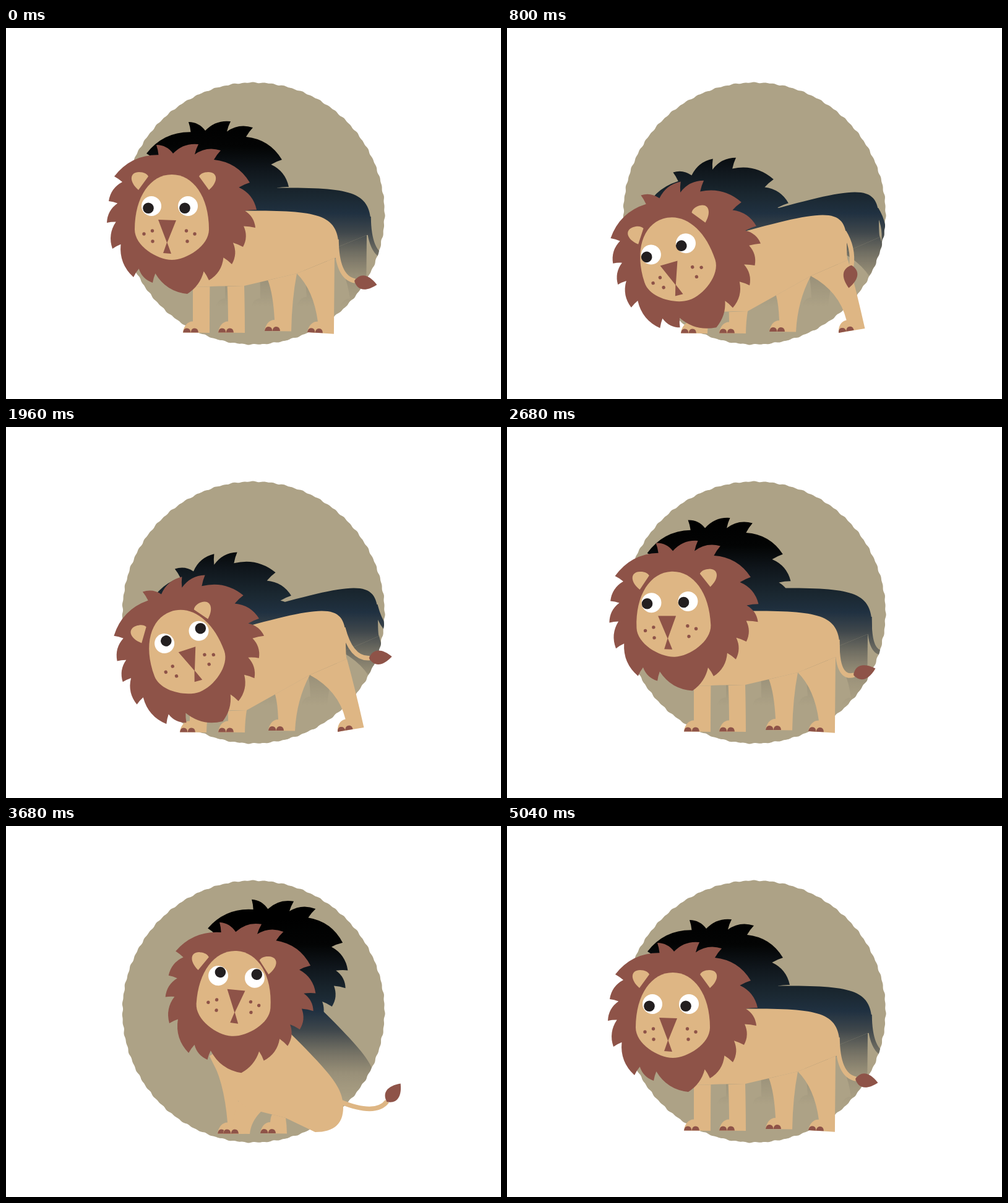
Write an HTML page with a canvas that moves like this. It is 800 px wide and 600 px high and loops after 5.08 s.

```html
<!DOCTYPE html>
<html lang="en">
<head>
<meta charset="utf-8">
<title>Lion</title>
<style>
  html, body { margin: 0; width: 100%; height: 100%; overflow: hidden; background: #fff; }
  canvas { display: block; }
</style>
</head>
<body>
<canvas id="stage" width="800" height="600"></canvas>
<script>
const LOOP = 5080, STEP = 40, RAD = Math.PI / 180;
const FUR = '#deb684', MANE = '#8e5348', DARK = '#231f20', GROUND = '#ada286';
const ctx = document.getElementById('stage').getContext('2d');
const shade = document.createElement('canvas');
shade.width = 800;
shade.height = 600;
const sctx = shade.getContext('2d');

const mix = ([ax, ay], [bx, by], u, v = u) => [ax + (bx - ax) * u, ay + (by - ay) * v];
const pairs = a => a.flatMap((v, i) => i % 2 ? [] : [[v, a[i + 1]]]);
const lift = (a, dy) => a.map((v, i) => i % 2 ? v - dy : v);

// back: neck, rump corner, rump; belly: haunch, groin, elbow, chest;
// front: both paw x and their y; far, near: hind paws; tail: reach and tuft angle;
// head: centre, angle, look shift.
const stand = {
  back: [340,296, 538,294, 538,358], belly: [531,372, 470,397, 385,417, 302,419],
  front: [286,343,492.5], far: [418,490], near: [487,492,3],
  tail: [30,67,10], head: [268,305,0, 0,0]
};
const crouch = {
  back: [350,338, 548,284, 549,345], belly: [551,375, 491,401, 389,458, 297,462],
  front: [281,343,493.5], far: [424,491], near: [536,493,-10],
  tail: [12,55,97], head: [276,373,-18, -8.6,-2.8]
};
const sit = {
  back: [430,306, 545,420, 545,455], belly: [500,495, 452,472, 412,462, 329,372],
  front: [342,351,497.5], far: [411,497], near: [468,458,40],
  tail: [75,-1,-53], head: [363,273,3.5, 16,-14]
};
const rise = {
  back: [380,304, 560,350, 562,395], belly: [522,441, 471,436, 398,434, 328,420],
  front: [330,349,499.5], far: [395,489], near: [432,471,55],
  tail: [60,-13,-92], head: [311.5,302.5,-.7, 1.5,0]
};
const alert = { ...crouch, back: lift(crouch.back, 5), tail: [43,49,-4], head: [284,367,-20, 18,-9.5] };
const tall = { ...stand, back: lift(stand.back, -2), tail: [27,57,-17], head: [270,302.5,-2.2, -4,-3] };

const timeline = [
  [0, stand], [520, crouch], [820, crouch], [1500, alert], [1980, alert], [2320, tall],
  [2740, tall], [3200, sit], [4380, sit], [4520, rise], [4700, stand], [LOOP, stand]
];

// Monotone cubic interpolation: rests at holds and turns, flows through passing poses.
function sample(part, t) {
  const last = timeline.length - 2;
  let i = 0;
  while (i < last && t >= timeline[i + 1][0]) i++;
  const [t0, a] = timeline[i], [t1, b] = timeline[i + 1], h = t1 - t0, u = (t - t0) / h;
  const slope = (j, n) => j < 0 || j > last ? 0 :
    (timeline[j + 1][1][part][n] - timeline[j][1][part][n]) / (timeline[j + 1][0] - timeline[j][0]);
  const blend = (p, q) => p * q > 0 ? 2 * p * q / (p + q) : 0;
  return a[part].map((v, n) => {
    const d = slope(i, n), m0 = blend(slope(i - 1, n), d), m1 = blend(d, slope(i + 1, n));
    return v + (b[part][n] - v) * u * u * (3 - 2 * u) + h * u * (1 - u) * (m0 * (1 - u) - m1 * u);
  });
}

// Each lock is a long bowed edge and a short cut back towards the centre.
function makeMane() {
  const path = new Path2D(), parting = [2, -102], chin = [25, 125];
  const right = pairs([43,-117, 79,-107, 126,-55, 137,-11, 135,18, 115,49, 97,77, 60,103]);
  const left = pairs([-31,107, -62,98, -96,52, -105,10, -102,-25, -93,-65, -25,-116]);
  const root = tip => mix(tip, [0, 0], .14);
  let [x, y] = parting;
  const edge = (bow, [X, Y]) => {
    path.quadraticCurveTo((x + X) / 2 + bow * (Y - y), (y + Y) / 2 - bow * (X - x), X, Y);
    [x, y] = [X, Y];
  };
  path.moveTo(x, y);
  right.forEach(tip => { edge(.25, tip); edge(-.06, root(tip)); });
  edge(.2, chin);
  left.forEach(tip => { edge(.25, root(tip)); edge(-.06, tip); });
  edge(.25, parting);
  return path;
}

function makeDisc() {
  const path = new Path2D();
  for (let i = 0; i < 720; i++) {
    const a = i * RAD / 2, r = 211.8 + .5 * Math.sin(83 * a) + .4 * Math.sin(47 * a + 1);
    path.lineTo(400 + r * Math.cos(a), 300 + r * Math.sin(a));
  }
  path.closePath();
  return path;
}

const mane = makeMane(), disc = makeDisc();
const face = new Path2D('M0 -68C34 -68 60 -33 60 21C60 47 24 70 0 70C-24 70 -60 47 -60 21C-60 -33 -34 -68 0 -68Z');
const ear = new Path2D('M57 -43C73 -57 71 -72 56 -72C48 -72 43 -69 41 -65Z');
const nose = new Path2D('M-22 5L7 6L-7.500 42L-1 60L-14 59L-8 42Z');
const toe = new Path2D('M0 0Q1 -7 6 -7Q12 -7 12.500 0Z');
const tuft = new Path2D('M-1 0C6 -15 20 -15 36 0C20 15 6 15 -1 0Z');

const dusk = sctx.createLinearGradient(0, 150, 0, 450);
[[0, '#000'], [.14, '#030404'], [.27, '#10171d'], [.4, '#1a2730'], [.5, '#203141'],
 [.6, 'rgba(40,52,64,.83)'], [.72, 'rgba(54,60,64,.48)'], [.84, 'rgba(70,70,65,.18)'],
 [1, 'rgba(80,80,70,0)']].forEach(s => dusk.addColorStop(...s));

function placed(c, x, y, deg, draw) {
  c.save();
  c.translate(x, y);
  c.rotate(deg * RAD);
  draw();
  c.restore();
}

function fill(c, path, color) {
  c.fillStyle = color;
  c.fill(path);
}

function dot(c, x, y, r, color) {
  c.fillStyle = color;
  c.beginPath();
  c.arc(x, y, r, 0, 7);
  c.fill();
}

// bow sets how far the back edge leans: low keeps the shin upright.
function drawLeg(c, from, to, x, y, deg = 0, bow = .1) {
  const cos = Math.cos(deg * RAD), sin = Math.sin(deg * RAD);
  const at = (u, v) => [x + u * cos - v * sin, y + u * sin + v * cos];
  const ankle = at(16, -18), heel = at(43, .5);
  c.fillStyle = FUR;
  c.beginPath();
  c.moveTo(...from);
  c.quadraticCurveTo(...mix(from, ankle, .8, .35), ...ankle);
  c.bezierCurveTo(...at(7, -18), ...at(1, -10), ...at(0, 0));
  c.lineTo(...heel);
  c.quadraticCurveTo(...mix(heel, to, bow, .55), ...to);
  c.fill();
  placed(c, x, y, deg, () => {
    fill(c, toe, MANE);
    c.translate(12.5, 0);
    fill(c, toe, MANE);
  });
}

function drawBody(c, t) {
  const [neck, corner, rump] = pairs(sample('back', t));
  const [haunch, groin, elbow, chest] = pairs(sample('belly', t));
  const [x1, x2, y] = sample('front', t);
  drawLeg(c, chest, mix(elbow, chest, .67), x1, y);
  drawLeg(c, mix(elbow, chest, .33), elbow, x2, y);
  drawLeg(c, mix(groin, elbow, .55), groin, ...sample('far', t));
  drawLeg(c, groin, haunch, ...sample('near', t), .5);
  c.fillStyle = FUR;
  c.beginPath();
  c.moveTo(...neck);
  c.bezierCurveTo(...mix(neck, corner, .8), ...corner, ...rump);
  c.quadraticCurveTo(rump[0], haunch[1], ...haunch);
  c.lineTo(...groin);
  c.lineTo(...elbow);
  c.quadraticCurveTo((elbow[0] + chest[0]) / 2, elbow[1], ...chest);
  c.fill();
  drawTail(c, mix(rump, corner, .25), sample('tail', t));
}

function drawTail(c, [x, y], [dx, dy, deg]) {
  const rx = x - 4, ex = rx + dx, ey = y + dy;
  c.strokeStyle = FUR;
  c.lineWidth = 7.5;
  c.beginPath();
  c.moveTo(rx, y);
  c.quadraticCurveTo(ex - 30 * Math.cos(deg * RAD), ey - 30 * Math.sin(deg * RAD), ex, ey);
  c.stroke();
  placed(c, ex, ey, deg, () => fill(c, tuft, MANE));
}

// Features slide by different shares of the look shift, as if at different depths.
function drawHead(c, [x, y, deg, lx, ly]) {
  const layer = (kx, ky, draw) => placed(c, lx * kx, ly * ky, 0, draw);
  const sides = [-1, 1];
  const px = Math.max(-8, lx * .5 - 5), py = ly * .65 + 3.3;
  placed(c, x, y, deg, () => {
    fill(c, mane, MANE);
    layer(-.05, -.45, () => sides.forEach(s => placed(c, 3, 0, 0, () => {
      c.scale(s, 1);
      fill(c, ear, FUR);
    })));
    layer(.35, .25, () => fill(c, face, FUR));
    layer(.7, .9, () => sides.forEach(s => {
      const ex = s * 29.5 - 3.5;
      dot(c, ex, -17, 16, '#fff');
      dot(c, ex + px, py - 17, 8.8, DARK);
    }));
    layer(.6, .97, () => sides.forEach(s => {
      dot(c, s * 27.5 - 4, 23, 2.7, MANE);
      dot(c, s * 41 - 4, 28, 2.7, MANE);
      dot(c, s * 28 - 3, 40, 2.7, MANE);
    }));
    layer(1, 1, () => fill(c, nose, MANE));
  });
}

function drawLion(c, t) {
  drawBody(c, t);
  drawHead(c, sample('head', t));
}

function drawShadow(t) {
  sctx.clearRect(0, 0, 800, 600);
  placed(sctx, 52, -37, 0, () => drawLion(sctx, t));
  sctx.globalCompositeOperation = 'source-in';
  sctx.fillStyle = dusk;
  sctx.fillRect(0, 0, 800, 600);
  sctx.globalCompositeOperation = 'source-over';
  ctx.save();
  ctx.clip(disc);
  ctx.drawImage(shade, 0, 0);
  ctx.restore();
}

const start = performance.now();
function frame() {
  const t = Math.floor((performance.now() - start) % LOOP / STEP) * STEP;
  ctx.fillStyle = '#fff';
  ctx.fillRect(0, 0, 800, 600);
  fill(ctx, disc, GROUND);
  drawShadow(t);
  drawLion(ctx, t);
  requestAnimationFrame(frame);
}
frame();
</script>
</body>
</html>
```
